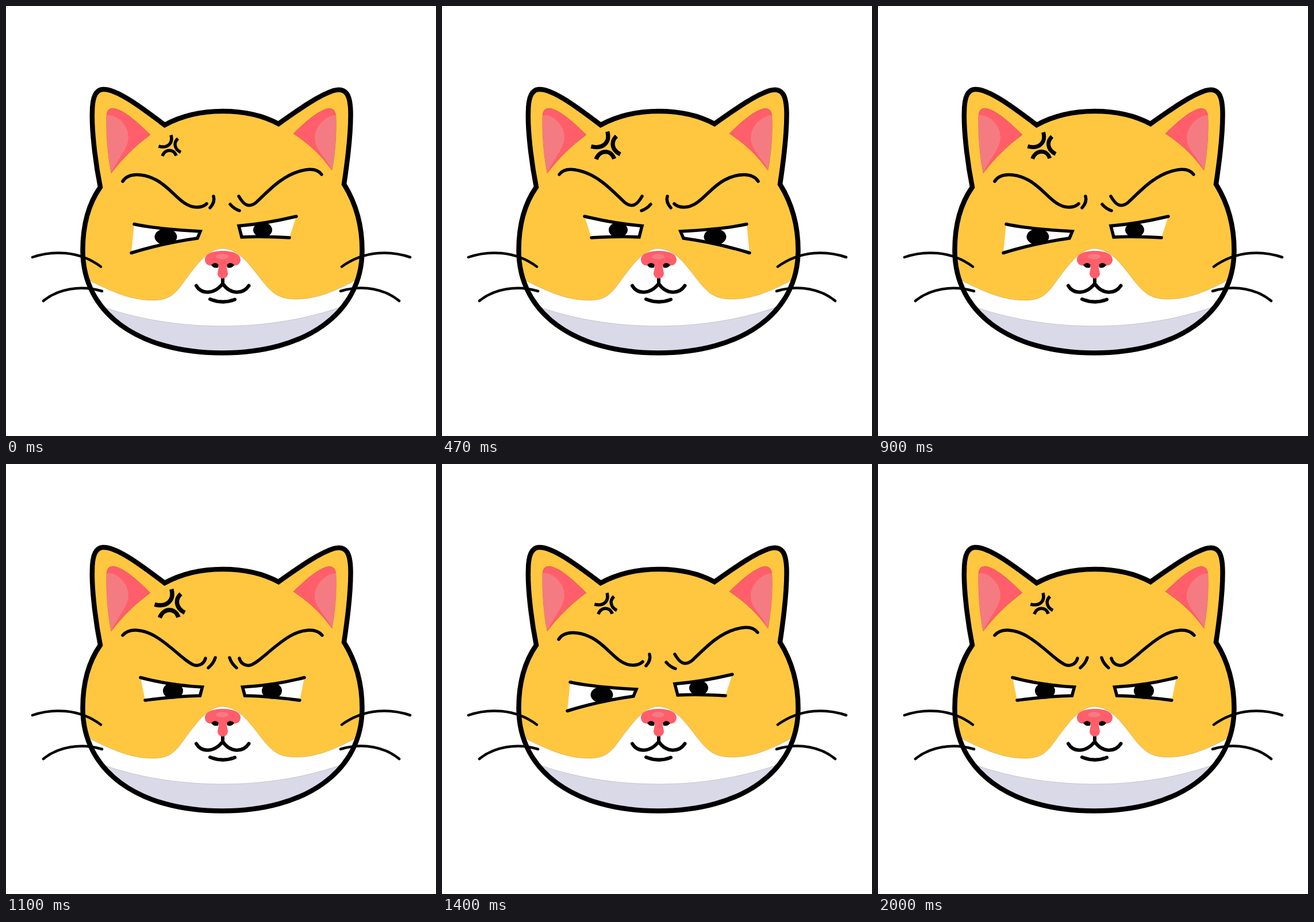
Animation of 748x748 px, one loop 2030 ms. Source, as an HTML page without scripts:

```html
<!DOCTYPE html>
<html lang="en">
<head>
<meta charset="utf-8">
<title>Grumpy cat</title>
<style>
  /* Frame counter: everything that moves is a function of --k */
  @property --k { syntax: "<number>"; inherits: true; initial-value: 1; }
  @keyframes count {
    0%, 1.47% { --k: 1; }
    100% { --k: 61; }
  }
  html, body { margin: 0; width: 100%; height: 100%; overflow: hidden; background: #fff; }
  svg { display: block; width: 100vw; height: 100vh; animation: count 2030ms steps(60) infinite; }

  .line { fill: none; stroke: #000; stroke-width: 5.5; stroke-linecap: round; stroke-linejoin: round; }
  .whisker { stroke-width: 4.5; }
  .mouth { stroke-width: 6; }
  .eye { fill: #fff; stroke: #000; stroke-width: 5.5; stroke-linecap: round; }
  .red { fill: #ff5e6a; }
  .pink { fill: #f47b82; }
  .edge { stroke: #000; stroke-opacity: .3; stroke-width: .5; }

  /* The swing repeats every 5 frames; opacity clamps to a hard cut */
  .face { --swing: cos((var(--k) - 1.5) * 72deg); }
  .left { opacity: calc(100 * var(--swing) - 50); }
  .right { opacity: calc(-100 * var(--swing) - 50); }
  .centre { opacity: calc(30 - 100 * var(--swing) * var(--swing)); }

  /* The throb repeats every 20 frames */
  .mark {
    stroke-linecap: butt;
    transform-origin: 284.8px 243.3px;
    transform: scale(calc(1.2 - .2 * cos((var(--k) - 1) * 18deg)));
  }
</style>
</head>
<body>
<svg viewBox="0 0 748 748">
  <defs>
    <path id="head" d="M164 315C155 270 149 215 150 185C150 160 155 146 168 145C190 143 230 172 276 207C305 191 340 183 377 183C415 183 448 191 474 205C515 176 545 155 570 147C592 141 599 155 599.5 185C600 220 594 270 588 310C608 342 619.5 378 619.5 425C619.5 534 522 603.5 376 603.5C230 603.5 133.5 534 133.5 425C133.5 380 145 342 164 315Z"/>
    <clipPath id="inside"><use href="#head"/></clipPath>

    <g id="tilt">
      <path class="line" d="M203 305C212 290 238 290 262 303C290 318 305 350 332 350C340 350 345 348 349 344"/>
      <path class="line" d="M549 293C541 282 526 283 512 287C480 295 455 323 436 341C422 353 413 345 405 331"/>
      <path class="line" d="M361 331Q364 341 355 351M390 345Q397 353 406 356"/>
      <path class="eye" d="M223 379.5Q262 388 338 392L333 404Q275 412 218 429.5"/>
      <ellipse cx="278" cy="401.5" rx="19.5" ry="14"/>
      <path class="eye" d="M505 366Q450 379 405 382.5L410 402Q445 400 493 403"/>
      <ellipse cx="446.5" cy="389.5" rx="16.5" ry="13"/>
    </g>

    <g id="half">
      <path class="line" d="M203 298C215 284 240 288 260 300C290 318 312 345 328 350C338 352 345 346 347 338"/>
      <path class="line" d="M364 337Q361 347 352 354.5"/>
      <path class="eye" d="M234 371.5Q285 385 341.5 388L337.5 403Q295 404 242 411"/>
      <ellipse cx="290.5" cy="394.5" rx="17.5" ry="14"/>
    </g>

    <path id="nostril" d="M357 450.5Q364 444 369.5 450L369 455Q361 457 357 450.5Z"/>
  </defs>

  <use href="#head" fill="#ffc740"/>
  <g clip-path="url(#inside)">
    <path class="edge" fill="#fff" d="M140 475C180 495 215 512 255 512C280 512 291 505 305 486C328 455 350 422 376 422C402 422 420 445 437 467C462 500 473 510 505 510C545 510 580 492 612 475L640 620H110Z"/>
    <path class="edge" fill="#dad9e8" d="M160 520C290 569 462 569 592 520L640 620H110Z"/>
  </g>

  <path class="red edge" d="M183 291C176 255 174 215 175 190Q176 177 187 178C205 180 230 203 251 224C222 246 203 265 183 291Z"/>
  <path class="pink" d="M175 190C190 187 213 205 213 228C213 248 194 265 183 291C176 255 174 215 175 190Z"/>
  <path class="red edge" d="M567 286C574 250 575 215 574 192Q573 178 562 178C545 180 520 202 500 222C530 242 549 261 567 286Z"/>
  <path class="pink" d="M574 190C558 190 537 208 537 230C537 250 556 262 567 286C574 250 575 215 574 190Z"/>

  <use href="#head" fill="none" stroke="#000" stroke-width="8.5"/>

  <path class="line whisker" d="M46 437C80 425 127 425 165 453.5M65 513C90 492 130 485 167 496"/>
  <path class="line whisker" d="M703 437C670 426 625 424 584 453.5M684 513C660 493 622 484 582 496"/>

  <path class="line mouth" d="M377 470V483M331 486.5C340 502 362 502 377 483C390 502 412 502 422.5 486.5M355 510Q377 519 398 510.5"/>
  <path class="red" d="M346 441C346 431 360 426 377 426S408 431 408 441C408 449 401 453 395 451C389 446 385 448 384 455L386 465C386 470 382 474 377 474S368 470 368 465L370 455C369 448 365 446 359 451C353 453 346 449 346 441Z"/>
  <use href="#nostril"/>
  <use href="#nostril" transform="translate(754) scale(-1 1)"/>
  <ellipse class="pink" cx="376" cy="436" rx="11" ry="4.5"/>

  <use class="face left" href="#tilt"/>
  <use class="face right" href="#tilt" transform="translate(753) scale(-1 1)"/>
  <g class="face centre">
    <use href="#half"/>
    <use href="#half" transform="translate(753) scale(-1 1)"/>
  </g>

  <path class="line mark" d="M287 224.5C291 239 281 248 265.5 244M299 230.5C291 238 293 249 304 254.5M272 261C277 248 292 248 296 260.5"/>
</svg>
</body>
</html>
```
